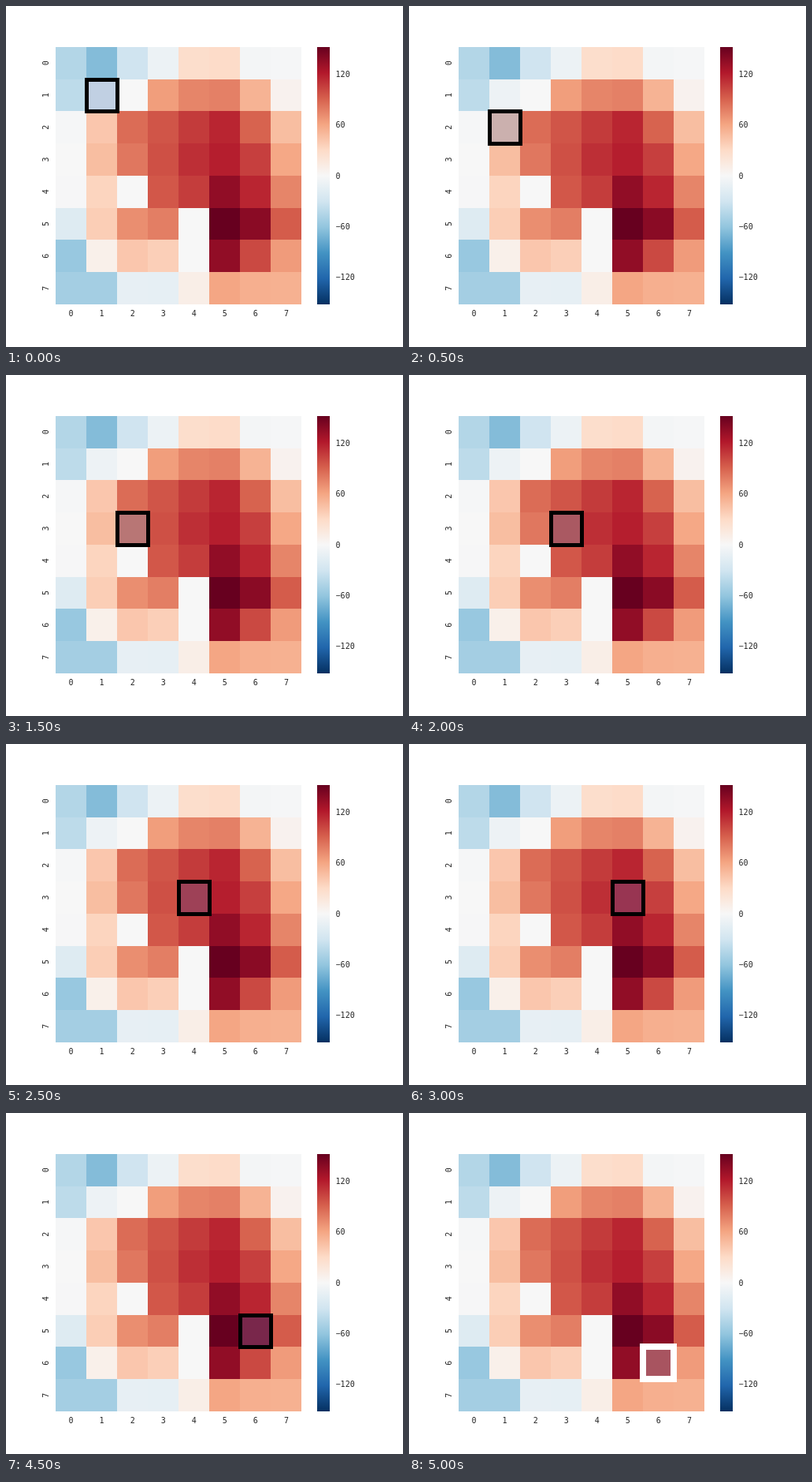
Recreate the animation shown at these times as an HTML page. Size 504 by 432 pixels, loop 5.5 s.

```html
<!DOCTYPE html>
<html lang="en">
<head>
<meta charset="utf-8">
<title>Heatmap walk</title>
<style>
  html, body { margin: 0; width: 100%; height: 100%; overflow: hidden; background: #fff; }
  svg { display: block; }
  text { font: 10px "DejaVu Sans Mono", monospace; fill: #262626; }
  .mid { text-anchor: middle; }
</style>
</head>
<body>
<svg id="stage" width="504" height="432" viewBox="0 0 504 432">
  <defs><linearGradient id="scale" x1="0" y1="1" x2="0" y2="0"></linearGradient></defs>
</svg>
<script>
const stage = document.getElementById('stage');
const LEFT = 63, TOP = 51.84, CELL_W = 39.06, CELL_H = 40.77;
const LIMIT = 152, STEP_MS = 500;

const palette = ['#053061', '#2166ac', '#4393c3', '#92c5de', '#d1e5f0', '#f7f7f7',
  '#fddbc7', '#f4a582', '#d6604d', '#b2182b', '#67001f'];

const values = [
  [-45, -66, -31, -9, 27, 29, -3, -2],
  [-40, -8, 0, 64, 75, 77, 53, 6],
  [-2, 42, 86, 96, 107, 116, 90, 47],
  [0, 47, 81, 98, 112, 119, 105, 59],
  [-1, 34, 0, 95, 106, 135, 116, 75],
  [-20, 38, 71, 78, 0, 152, 138, 93],
  [-58, 8, 42, 37, 0, 135, 101, 65],
  [-52, -52, -13, -14, 10, 60, 55, 54]
];

// Visited cells as [row, column]
const path = [[1, 1], [2, 1], [3, 1], [3, 2], [3, 3], [3, 4], [3, 5], [3, 6],
  [4, 6], [5, 6], [6, 6]];

const colX = c => Math.round(LEFT + c * CELL_W);
const rowY = r => Math.round(TOP + r * CELL_H);

function set(el, attrs) {
  for (const key in attrs) el.setAttribute(key, attrs[key]);
}

function add(parent, tag, attrs, text) {
  const el = document.createElementNS('http://www.w3.org/2000/svg', tag);
  set(el, attrs);
  if (text !== undefined) el.textContent = text;
  parent.appendChild(el);
  return el;
}

function colorOf(value) {
  const pos = (value / LIMIT + 1) / 2 * (palette.length - 1);
  const i = Math.min(Math.floor(pos), palette.length - 2);
  const channel = (hex, k) => parseInt(hex.substr(1 + 2 * k, 2), 16);
  const mix = k => Math.round(channel(palette[i], k) +
    (channel(palette[i + 1], k) - channel(palette[i], k)) * (pos - i));
  return `rgb(${mix(0)},${mix(1)},${mix(2)})`;
}

function box(r, c, inset) {
  return {
    x: colX(c) + inset, y: rowY(r) + inset,
    width: colX(c + 1) - colX(c), height: rowY(r + 1) - rowY(r)
  };
}

values.forEach((row, r) => row.forEach((value, c) =>
  add(stage, 'rect', { ...box(r, c, 0), fill: colorOf(value) })));

for (let i = 0; i < 8; i++) {
  const x = LEFT + (i + 0.5) * CELL_W, y = TOP + (i + 0.5) * CELL_H;
  add(stage, 'text', { class: 'mid', x, y: 393.4 }, i);
  add(stage, 'text', { class: 'mid', transform: `translate(53.8 ${y}) rotate(-90)` }, i);
}

const scale = document.getElementById('scale');
palette.forEach((color, i) => add(scale, 'stop',
  { offset: i / (palette.length - 1), 'stop-color': color }));
add(stage, 'rect', { x: 395, y: 52, width: 16, height: 326, fill: 'url(#scale)' });
for (let v = -120; v <= 120; v += 60) {
  const y = TOP + 4 * CELL_H * (1 - v / LIMIT) + 3.6;
  add(stage, 'text', { x: 418.6, y }, String(v).replace('-', '\u2212'));
}

const cursor = add(stage, 'rect', { fill: '#4c72b0', 'fill-opacity': 0.27 });
let shown = -1;

function draw(now) {
  const step = Math.floor(now / STEP_MS) % path.length;
  if (step !== shown) {
    shown = step;
    const atGoal = step === path.length - 1;
    // Odd line widths sit on half pixels to stay crisp
    set(cursor, {
      ...box(...path[step], atGoal ? 0 : 0.5),
      stroke: atGoal ? '#fff' : '#000',
      'stroke-width': atGoal ? 8 : 5
    });
  }
  requestAnimationFrame(() => draw(performance.now()));
}
draw(performance.now());
</script>
</body>
</html>
```
